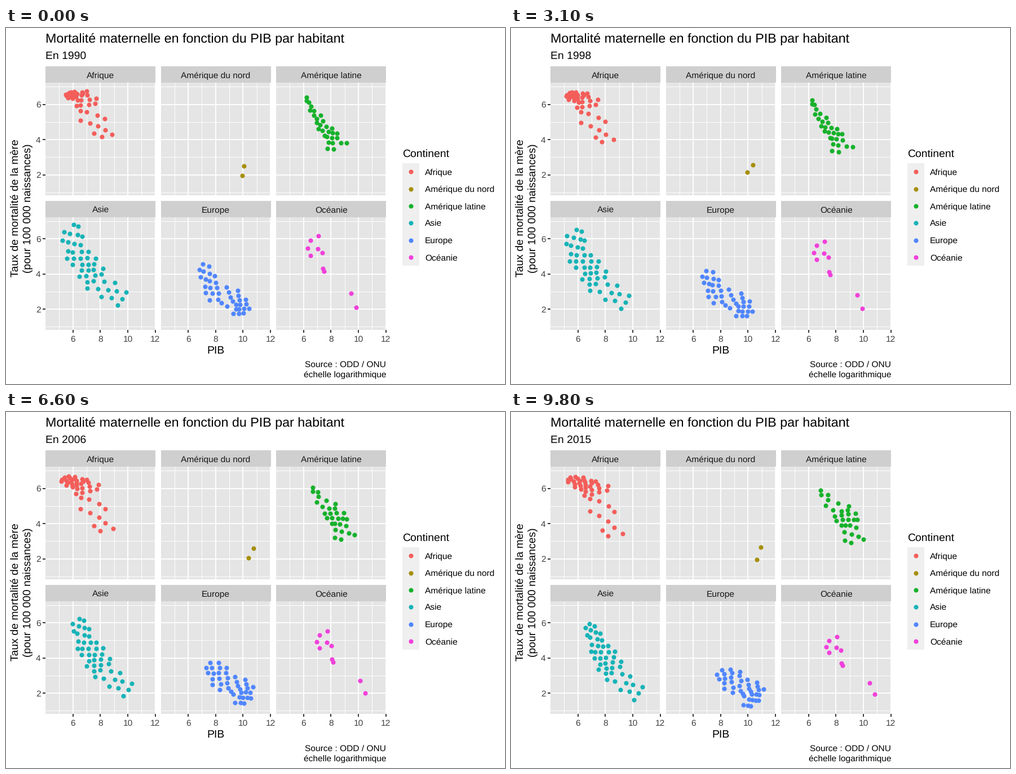
Write a matplotlib script that moves like this. It is 885 by 632 pixels and loops after 10 s.

```python
import numpy as np
import matplotlib.pyplot as plt
from matplotlib.animation import FuncAnimation
from matplotlib.patches import Rectangle

W, H, DPI = 885, 632, 100
FRAMES, INTERVAL = 100, 100
PX = 72 / DPI
BASE, SMALL, LARGE = 19.33, 15.47, 23.2
LEFT, TOP, PANEL_W, PANEL_H = 70.1, 97.4, 194.9, 200.0
STEP_X, STEP_Y, STRIP_H = 204.55, 238.7, 29.3
FIRST, LAST = 1990, 2015
GOLDEN = 0.618034

plt.rcParams.update({"font.family": "Liberation Sans", "text.hinting": "none"})
rng = np.random.default_rng(7)

COLORS = {
    "Afrique": "#F35E5A",
    "Amérique du nord": "#A68F0A",
    "Amérique latine": "#17B12B",
    "Asie": "#17B3B7",
    "Europe": "#5086FF",
    "Océanie": "#F040DA",
}


class Swarm:
    """Dots moving from start to end, bowed sideways around 2001."""

    def __init__(self, start, end, bow=(0, 0), wobble=0):
        self.start, self.end = np.array(start, float), np.array(end, float)
        self.bow, self.wobble = np.array(bow), wobble
        self.phase = rng.uniform(0, 2 * np.pi, len(self.start))

    def at(self, year):
        growth = 1 / (1 + np.exp((2005.5 - year) / 2))
        decline = (year - FIRST) / (LAST - FIRST)
        bell = np.exp(-((year - 2001) / 6) ** 2)
        pos = self.start + (self.end - self.start) * (growth, decline)
        pos += self.bow * bell
        pos[:, 0] += self.wobble * np.sin(0.7 * year + self.phase)
        return pos.T


def scatter_along(quartiles, count):
    """Spread dots along a spine of (x, y, half width) quartile points."""
    place = np.linspace(0, len(quartiles) - 1, count)
    x, y, half = (np.interp(place, range(len(quartiles)), c)
                  for c in zip(*quartiles))
    side = 2 * (np.arange(1, count + 1) * GOLDEN % 1) - 1
    return np.column_stack([x + side * half, y - 0.6 * side * half])


def cloud(count, start, end, dip):
    return Swarm(scatter_along(start, count), scatter_along(end, count),
                 (-dip, 0), wobble=2)


islands = np.array([(535, 391), (540, 404), (540, 377), (553, 392), (554, 369),
                    (561, 399), (562, 427), (564, 432), (612, 471), (621, 496)])
islands_end = np.column_stack([islands[:, 0] + 24,
                               islands[:, 1] + 0.2 * (520 - islands[:, 1])])

swarms = {
    "Afrique": cloud(
        42,
        [(109, 116, 5), (118, 118, 9), (132, 120, 14), (146, 140, 22), (178, 196, 12)],
        [(102, 117, 8), (124, 124, 12), (138, 133, 16), (158, 145, 24), (182, 225, 16)],
        dip=10),
    "Amérique du nord": Swarm([(422, 245), (419, 262)], [(443, 240), (436, 262)],
                              [(8, 0), (0, -8)]),
    "Amérique latine": cloud(
        29,
        [(531, 123, 3), (550, 159, 7), (567, 180, 9), (576, 196, 12), (590, 213, 18)],
        [(547, 140, 5), (583, 176, 17), (596, 186, 18), (600, 203, 16), (612, 233, 14)],
        dip=0),
    "Asie": cloud(
        44,
        [(114, 352, 18), (122, 395, 20), (143, 423, 18), (160, 447, 22), (208, 486, 16)],
        [(136, 377, 8), (155, 413, 16), (167, 440, 20), (184, 461, 18), (226, 505, 16)],
        dip=6),
    "Europe": cloud(
        38,
        [(348, 421, 14), (362, 455, 12), (383, 477, 24), (415, 489, 14), (420, 506, 14)],
        [(372, 460, 14), (393, 474, 20), (412, 491, 22), (436, 498, 14), (424, 522, 16)],
        dip=5),
    "Océanie": Swarm(islands, islands_end, (2, 0)),
}

fig = plt.figure(figsize=(W / DPI, H / DPI), dpi=DPI, facecolor="white")
ax = fig.add_axes([0, 0, 1, 1])
ax.set(xlim=(0, W), ylim=(H, 0))
ax.axis("off")


def text(x, y, s, size=SMALL, color="black", **kw):
    return ax.text(x, y, s, fontsize=size * PX, color=color, va="baseline", **kw)


def box(x, y, w, h, color):
    ax.add_patch(Rectangle((x, y), w, h, fc=color, ec="none", zorder=0))


def line(x0, y0, x1, y1, width, color="white"):
    ax.plot([x0, x1], [y0, y1], color=color, lw=width * PX,
            solid_capstyle="butt", zorder=1)


def dots(color, x=(), y=()):
    return ax.plot(x, y, "o", color=color, ms=8.1 * PX, mew=0, zorder=3)[0]


def draw_panel(name, col, row):
    x, y = LEFT + col * STEP_X, TOP + row * STEP_Y
    right, bottom = x + PANEL_W, y + PANEL_H
    box(x, y - STRIP_H, PANEL_W, STRIP_H, "#CFCFCF")
    box(x, y, PANEL_W, PANEL_H, "#E5E5E5")
    text(x + PANEL_W / 2, y - 8.4, name, color="#161616", ha="center")
    for value in range(5, 13):
        gx = x + 48.4 + (value - 6) * 24.36
        major = value % 2 == 0
        line(gx, y, gx, bottom, 1.87 if major else 0.93)
        if major and row == 1:
            line(gx, bottom, gx, bottom + 4.8, 1.87, "#2B2B2B")
            text(gx, 556.7, str(value), color="#404040", ha="center")
    for value in range(1, 8):
        gy = y + 38.1 + (6 - value) * 31.25
        major = value % 2 == 0
        line(x, gy, right, gy, 1.87 if major else 0.93)
        if major and col == 0:
            line(x - 4.8, gy, x, gy, 1.87, "#2B2B2B")
            text(61.5, gy + 5.6, str(value), color="#404040", ha="right")


text(70, 26.3, "Mortalité maternelle en fonction du PIB par habitant", LARGE)
subtitle = text(70, 55, "", BASE)
text(372, 578.3, "PIB", BASE, ha="center")
for x, label in ((23, "Taux de mortalité de la mère"),
                 (44, "(pour 100 000 naissances)")):
    text(x, 320, label, BASE, ha="center", rotation=90, rotation_mode="anchor")
text(674, 603.2, "Source : ODD / ONU", ha="right")
text(674, 619.8, "échelle logarithmique", ha="right")

text(703, 228.8, "Continent", BASE)
artists = {}
for i, (name, color) in enumerate(COLORS.items()):
    draw_panel(name, i % 3, i // 3)
    key_y = 240 + 30.36 * i
    box(703, key_y, 30.36, 30.36, "#EFEFEF")
    dots(color, [718.2], [key_y + 15.2])
    text(743, key_y + 20.9, name)
    artists[name] = dots(color)


def year_at(frame):
    """Hold each year, with one half-way frame before the next."""
    if frame >= 97:
        return LAST - 0.5 if frame == 97 else LAST
    half = 0.5 if frame % 4 == 2 else 0
    return FIRST + (frame + 1) // 4 + half


def update(frame):
    year = year_at(frame)
    subtitle.set_text(f"En {int(year)}")
    for name, artist in artists.items():
        artist.set_data(*swarms[name].at(year))
    return [subtitle, *artists.values()]


anim = FuncAnimation(fig, update, frames=FRAMES, interval=INTERVAL,
                     repeat=True, repeat_delay=0, blit=False)
plt.show()
```
